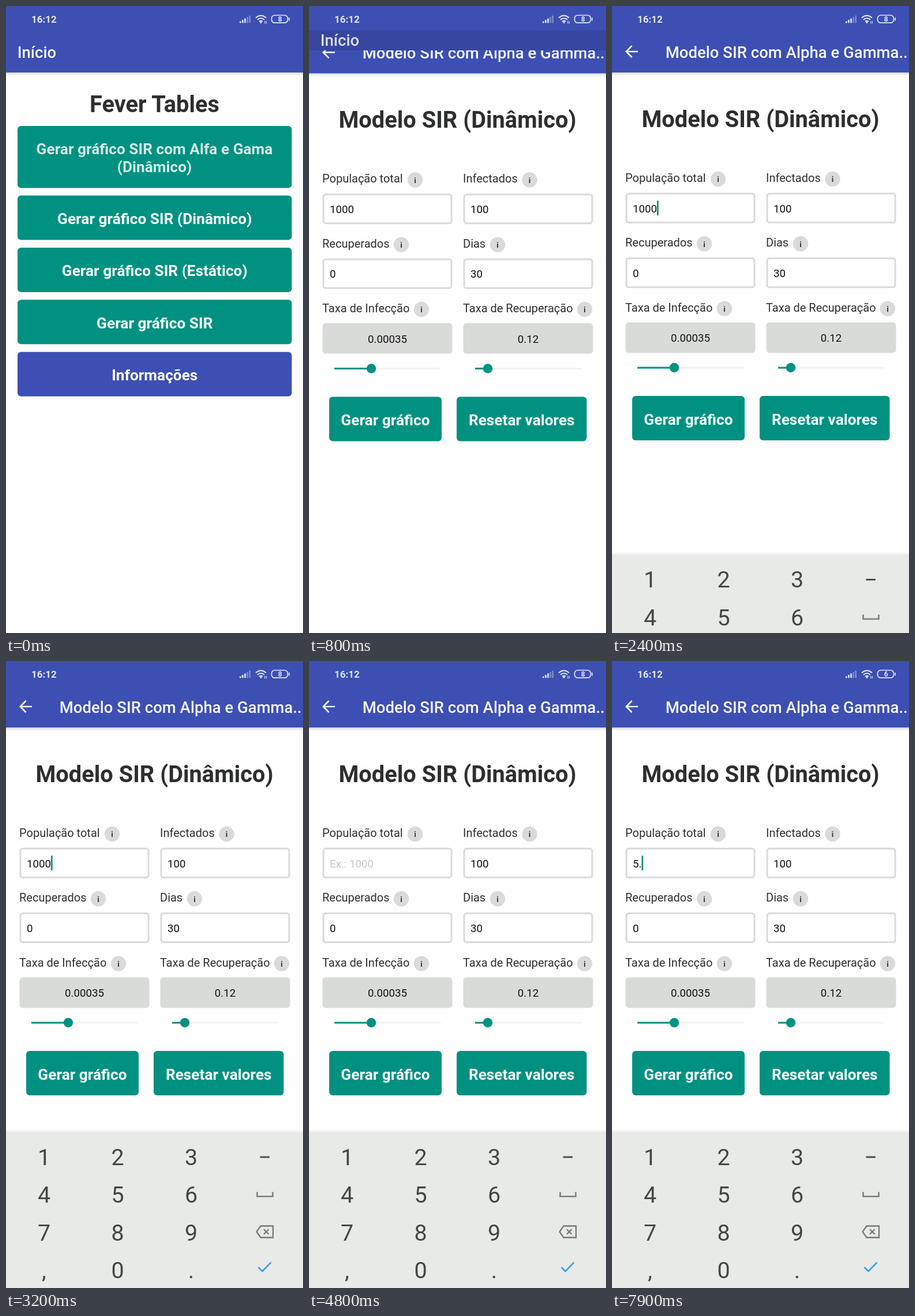
Animation of 515 by 1087 pixels, one loop 8 s. Source, as an HTML page:

```html
<!DOCTYPE html>
<html lang="pt">
<head>
<meta charset="utf-8">
<style>
html, body { margin: 0; height: 100%; overflow: hidden; background: #fdfefd; }
body > svg { display: block; width: 100%; height: 100%; }
text { font-family: Roboto, "Noto Sans", sans-serif; white-space: pre; }
.mid { text-anchor: middle; }
.title { font-size: 39.8px; font-weight: 700; fill: #2d2f2e; }
.head { font-size: 27.5px; font-weight: 500; fill: #f6f7fc; }
.btn { font-size: 26.25px; font-weight: 700; fill: #fbfffe; }
.label { font-size: 20px; fill: #2f3130; }
.value { font-size: 18.7px; fill: #111; }
.info { font-size: 13.5px; font-weight: 700; fill: #333; }
.key { font-size: 39.5px; fill: #444645; }
.line { fill: none; stroke-linecap: butt; }
</style>
</head>
<body>
<svg viewBox="0 0 515 1087" preserveAspectRatio="none">
  <defs>
    <linearGradient id="down" x2="0" y2="1">
      <stop stop-color="#000" stop-opacity=".13"/><stop offset="1" stop-color="#000" stop-opacity="0"/>
    </linearGradient>
    <linearGradient id="up" x2="0" y2="1">
      <stop stop-color="#000" stop-opacity="0"/><stop offset="1" stop-color="#000" stop-opacity=".07"/>
    </linearGradient>
  </defs>
  <g id="home"></g>
  <rect id="shade" y="42" width="515" height="1045"/>
  <svg id="sheet" width="515" height="1045" overflow="hidden"><g id="form"></g></svg>
  <g id="pad"></g>
  <g id="status"></g>
</svg>
<script>
const TEAL = '#009181', BLUE = '#3d4fb3', GREY = '#d9dbd9', H = 1045, TOP = 42;
const $ = id => document.getElementById(id);
const rect = (x, y, w, h, fill, r = 0, more = '') =>
  `<rect x="${x}" y="${y}" width="${w}" height="${h}" rx="${r}" fill="${fill}" ${more}/>`;
const text = (x, y, cls, s, more = '') => `<text x="${x}" y="${y}" class="${cls}" ${more}>${s}</text>`;
const circle = (x, y, r, fill) => `<circle cx="${x}" cy="${y}" r="${r}" fill="${fill}"/>`;
const line = (d, color, w, more = '') =>
  `<path class="line" d="${d}" stroke="${color}" stroke-width="${w}" ${more}/>`;
const button = (x, y, w, h, fill, s) =>
  rect(x, y, w, h, fill, 6) + text(x + w / 2, y + h / 2 + 11, 'btn mid', s);
const page = (x, s) => rect(0, TOP, 515, 1100, '#fdfefd') + rect(0, TOP, 515, 73.3, BLUE) +
  rect(0, 115.3, 515, 6, 'url(#down)') + text(x, 89.5, 'head', s);

// Home screen
$('home').innerHTML = page(19.8, 'Início') + text(257.5, 184, 'title mid', 'Fever Tables') +
  rect(20, 208, 475.5, 107.5, TEAL, 6) +
  '<g id="pressed">' + text(257.5, 257, 'btn mid', 'Gerar gráfico SIR com Alfa e Gama') +
  text(257.5, 287.7, 'btn mid', '(Dinâmico)') + '</g>' +
  ['Gerar gráfico SIR (Dinâmico)', 'Gerar gráfico SIR (Estático)', 'Gerar gráfico SIR', 'Informações']
    .map((s, i) => button(20, 328.5 + i * 90.4, 475.5, 77, i < 3 ? TEAL : BLUE, s)).join('');

// Form screen
const field = (col, row, label, infoX, value, id) => {
  const x = 23 + col * 244, y = 305 + row * 112.3, fixed = row == 2;
  return text(x, y, 'label', label) + circle(infoX, y - 5, 13.2, GREY) +
    text(infoX, y + .3, 'info mid', 'i') +
    rect(x + 2, y + 20.3, 222, 50, fixed ? GREY : '#fefffe', 4, `stroke="${GREY}" stroke-width="3"`) +
    text(x + (fixed ? 113 : 13), y + 52.6, fixed ? 'value mid' : 'value', value, id ? `id="${id}"` : '');
};
const slider = (x, thumb) => rect(x, 625.6, 184.5, 3, '#f2f4f2') +
  rect(x, 625.6, thumb - x, 3, TEAL) + circle(thumb, 627, 8.2, TEAL);
$('form').innerHTML = page(92.8, 'Modelo SIR com Alpha e Gamma..') +
  line('M45 79H25M34.5 69 24.8 79 34.5 89', '#f6f7fc', 2.7) +
  text(257.5, 210, 'title mid', 'Modelo SIR (Dinâmico)') +
  field(0, 0, 'População total', 184, '', 'total') + field(1, 0, 'Infectados', 382.5, '100') +
  field(0, 1, 'Recuperados', 160, '0') + field(1, 1, 'Dias', 327, '30') +
  field(0, 2, 'Taxa de Infecção', 195, '0.00035') + field(1, 2, 'Taxa de Recuperação', 478, '0.12') +
  rect(36, 337.5, 2.6, 25.5, '#00897b', 0, 'id="caret"') +
  slider(44, 108) + slider(288, 310) +
  button(35, 676, 195, 77, TEAL, 'Gerar gráfico') + button(256, 676, 225.5, 77, TEAL, 'Resetar valores');

// Number pad
$('pad').innerHTML = rect(0, 812, 515, 5, 'url(#up)') + rect(0, 817, 515, 271, '#e8eae7') +
  [...'123456789,0.'].map((k, i) =>
    text(66 + i % 3 * 127.5, 874 + Math.floor(i / 3) * 65.4, 'key mid', k)).join('') +
  line('M440.5 860H457', '#444645', 2.8) +
  line('M435.5 920.5V928.3H462.5V920.5', '#7d7f7d', 2.6) +
  line('M441.5 979.5H463V999.5H441.5L434.5 989.5ZM447 985.3 455.5 993.8M455.5 985.3 447 993.8', '#767876', 2.3) +
  line('M437.5 1051 444.5 1058 459.5 1042.5', '#3fa2e0', 2.7);

// Status bar
const INK = '#e4e7f6';
$('status').innerHTML = rect(0, 0, 515, TOP + .3, BLUE) +
  text(44, 29, '', '16:12', `font-size="17" font-weight="600" fill="${INK}"`) +
  [0, 1, 2, 3, 4].map(i =>
    rect(405 + i * 4.1, 26.4 - i * 2.5, 2.6, 3 + i * 2.5, INK, .8, i > 2 ? 'opacity=".4"' : '')).join('') +
  line('M433 20.5Q442 12.5 451 20.5M436 23.8Q442 18.7 448 23.8M439 27Q442 24.6 445 27', INK, 2.1) +
  circle(442, 28.5, 1.5, INK) + line('M448.8 26V30.5M451.3 26V30.5', INK, 1.1) +
  rect(460.5, 16, 28, 13.2, 'none', 5.5, `stroke="${INK}" stroke-width="1.7"`) +
  line('M491 20V25.5', INK, 1.7) +
  text(475.3, 27, 'mid', '8', `id="battery" font-size="12" font-weight="700" fill="${INK}"`);

const clamp = v => Math.max(0, Math.min(1, v));
const bez = (s, a, b) => 3 * (1 - s) ** 2 * s * a + 3 * (1 - s) * s * s * b + s ** 3;
function reveal(x) {
  let lo = 0, hi = 1;
  for (let i = 0; i < 24; i++) {
    const m = (lo + hi) / 2;
    if (bez(m, .20833, .25) < x) lo = m; else hi = m;
  }
  return x >= 1 ? 1 : bez(lo, .82, 1);
}

const typed = [[0, '1000'], [3400, '100'], [3700, '10'], [4000, '1'], [4300, ''], [7200, '5'], [7900, '5.']];
const caretOn = [[2000, 2600], [3200, 4800], [5300, 5800], [6300, 6800], [7200, 7700], [7900, 8000]];
const total = $('total'), caret = $('caret');

function draw(now) {
  const t = now % 8000;

  // The new screen is uncovered from the bottom while the old one drifts up and darkens.
  const p = reveal(clamp((t - 579) / 378)), gap = H * (1 - p);
  $('pressed').setAttribute('opacity', .83 + .17 * clamp((t - 300) / 250));
  $('home').setAttribute('transform', `translate(0 ${-.02 * H * p})`);
  $('shade').setAttribute('opacity', .1 * clamp(p / .36));
  $('sheet').setAttribute('y', TOP + gap);
  $('form').setAttribute('transform', `translate(0 ${-TOP - .959 * gap})`);

  const k = clamp((t - 2318) / 282);
  $('pad').setAttribute('transform', `translate(0 ${276 * (t < 2318) + 270 * (1 - k) ** 2})`);

  const value = typed.filter(e => e[0] <= t).pop()[1];
  total.textContent = value || 'Ex.: 1000';
  total.style.fill = value ? '' : '#c6c8c6';
  caret.setAttribute('x', 36 + (value ? total.getComputedTextLength() : 0));
  caret.setAttribute('opacity', +caretOn.some(([a, b]) => t >= a && t < b));
  $('battery').textContent = t < 6300 ? 8 : 6;
  requestAnimationFrame(draw);
}
draw(performance.now());
</script>
</body>
</html>
```
